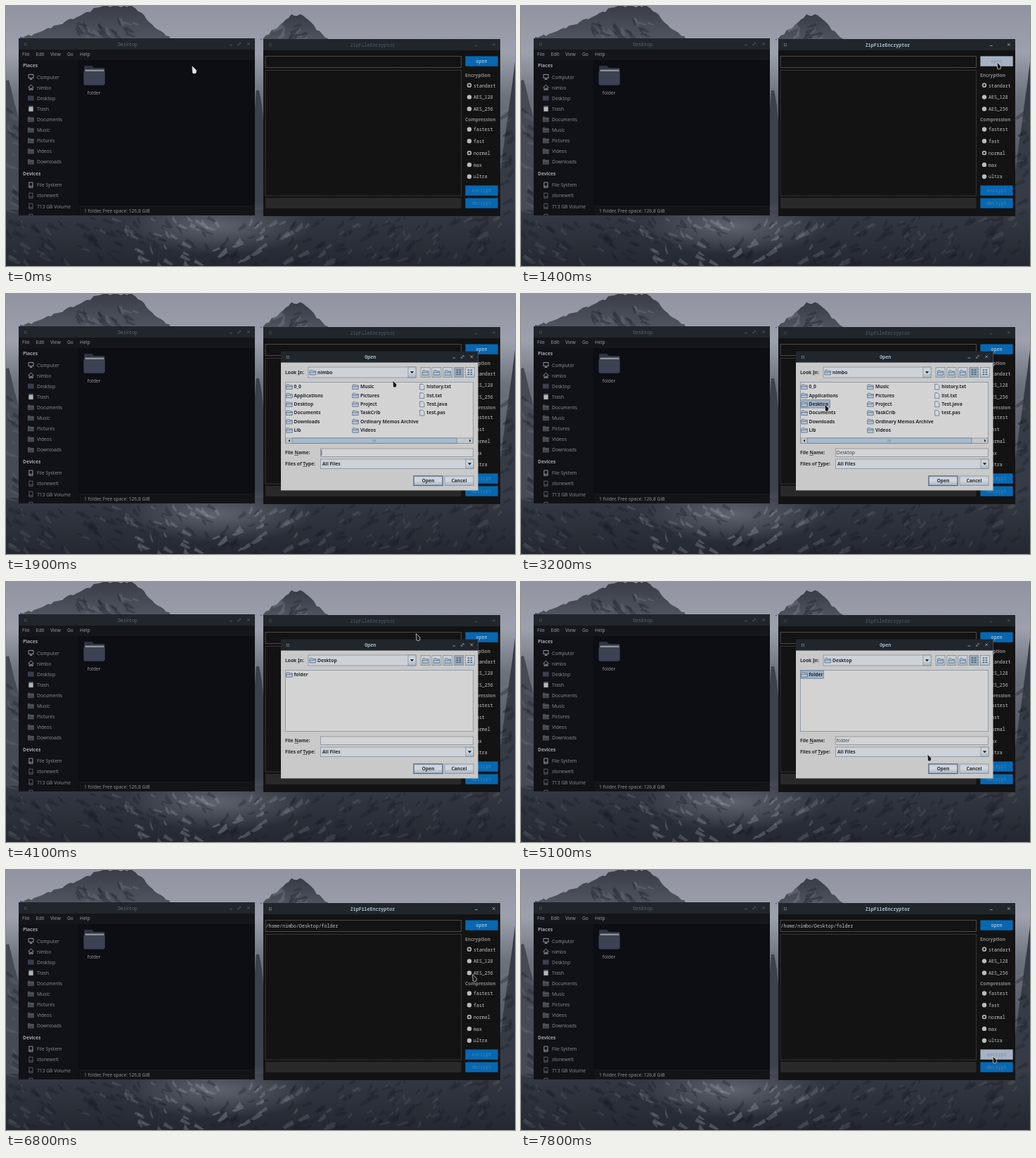
Write an HTML page that moves like this. It is 724 px wide and 370 px high and loops after 8 s.

```html
<!DOCTYPE html>
<html lang="en">
<head>
<meta charset="utf-8">
<title>Zip encryptor demo</title>
<style>
html, body { margin: 0; width: 100%; height: 100%; overflow: hidden; background: #272c35; }
svg { display: block; width: 724px; height: 370px; }
text { font: 6.7px "Noto Sans", sans-serif; white-space: pre; }
.bold { font-weight: 700; }
.mono { font: 6.6px "Noto Sans Mono", "DejaVu Sans Mono", monospace; }
.mono.bold { font-weight: 700; }
.mid { text-anchor: middle; }
</style>
</head>
<body>
<svg id="stage" viewBox="0 0 724 370" xmlns="http://www.w3.org/2000/svg">
  <defs>
    <linearGradient id="sky" x2="0" y2="1">
      <stop offset="0" stop-color="#9194a0"/><stop offset=".18" stop-color="#9da1ad"/>
      <stop offset=".35" stop-color="#6d717c"/><stop offset="1" stop-color="#2b303a"/>
    </linearGradient>
    <linearGradient id="rock" x2="0" y2="1">
      <stop offset="0" stop-color="#383c46"/><stop offset="1" stop-color="#50545f"/>
    </linearGradient>
    <linearGradient id="valley" x2="0" y2="1">
      <stop offset="0" stop-color="#343944"/><stop offset="1" stop-color="#232831"/>
    </linearGradient>
    <radialGradient id="snow">
      <stop offset="0" stop-color="#777c87" stop-opacity=".65"/><stop offset="1" stop-color="#777c87" stop-opacity="0"/>
    </radialGradient>
    <linearGradient id="metal" x2="0" y2="1">
      <stop offset="0" stop-color="#c3ccd6"/><stop offset=".45" stop-color="#d5d9dd"/>
      <stop offset="1" stop-color="#a6b5c5"/>
    </linearGradient>
    <clipPath id="sidebarClip"><rect x="18" y="77" width="86" height="221"/></clipPath>
  </defs>
</svg>
<script>
const LOOP = 8000, STEP = 100;
const USER = 'nimbo';
const stage = document.getElementById('stage');

function add(parent, tag, attrs = {}, content) {
  const node = document.createElementNS('http://www.w3.org/2000/svg', tag);
  for (const key in attrs) node.setAttribute(key, attrs[key]);
  if (content !== undefined) node.textContent = content;
  parent.append(node);
  return node;
}
const group = (parent, attrs) => add(parent, 'g', attrs);
const box = (p, x, y, width, height, fill, stroke, extra) =>
  add(p, 'rect', { x, y, width, height, fill, ...(stroke && { stroke, 'stroke-width': .7 }), ...extra });
const path = (p, d, fill = 'none', stroke = 'none', extra) =>
  add(p, 'path', { d, fill, stroke, 'stroke-width': .8, ...extra });
const label = (p, x, midY, content, fill, cls = '') =>
  add(p, 'text', { x, y: midY + 2.4, fill, class: cls }, content);

let seed = 11;
function random() {
  seed = (seed * 16807) % 2147483647;
  return seed / 2147483647;
}

// Mountain with a flat summit; its slopes sag inward and are broken by noise.
function mountain(left, summitLeft, summitRight, right, top, base, fill) {
  let d = `M${left} ${base}`;
  for (let x = left; x <= right; x += 4) {
    const rise = x < summitLeft ? (x - left) / (summitLeft - left)
      : x > summitRight ? (right - x) / (right - summitRight) : 1;
    d += `L${x} ${base - (base - top) * rise ** 1.15 + (random() - .5) * 4}`;
  }
  path(stage, d + `L${right} ${base}Z`, fill);
}

// Slanted facets that run down toward the snowy centre of the valley.
function facets(x, y, width, height, count) {
  for (let i = 0; i < count; i++) {
    const fx = x + random() * width, fy = y + random() * height;
    const near = Math.max(0, 1 - Math.abs(fx - 300) / 190);
    const run = (fx < 300 ? 1 : -1) * (4 + random() * 12), drop = 4 + random() * 9;
    const lit = random() < .3 + near * .35;
    path(stage, `M${fx} ${fy}l${run} ${drop}l${-run * .3} ${drop * .2}l${-run * .9} ${-drop * .6}Z`,
      lit ? '#8b909b' : '#171b23', 'none', { opacity: lit ? .15 + near * .3 : .3 });
  }
}

function drawBackdrop() {
  box(stage, 0, 0, 724, 370, 'url(#sky)');
  mountain(20, 136, 182, 234, 0, 46, 'url(#rock)');
  mountain(362, 406, 422, 458, 12, 47, 'url(#rock)');
  mountain(-40, -8, 4, 60, 105, 300, '#454a55');
  mountain(340, 356, 362, 380, 120, 300, '#3c414c');
  mountain(692, 724, 740, 760, 80, 300, '#363b45');
  box(stage, 0, 290, 724, 80, 'url(#valley)');
  add(stage, 'ellipse', { cx: 300, cy: 314, rx: 135, ry: 40, fill: 'url(#snow)' });
  facets(0, 296, 724, 68, 260);
  facets(100, 14, 85, 28, 26);
  facets(392, 22, 38, 20, 14);
  facets(0, 130, 12, 160, 16);
  facets(710, 110, 12, 180, 16);
}

function titleBar(p, x, y, width, title, color, cls = '', canMaximize = true) {
  const bar = group(p), right = x + width;
  box(bar, x, y, width, 16, '#20262c');
  for (let i = 0; i < 4; i++) box(bar, x + 8 + (i & 1) * 2.5, y + 6.5 + (i >> 1) * 2.5, 1.2, 1.2, color);
  label(bar, x + width / 2 - 13, y + 8.2, title, color, 'mid mono ' + cls);
  path(bar, `M${right - 36} ${y + 9.5}h3.5`, 'none', color);
  path(bar, `M${right - 11} ${y + 6}l3.6 3.6m0-3.6l-3.6 3.6`, 'none', color);
  if (canMaximize)
    path(bar, `M${right - 24} ${y + 9.8}l3.6-3.6m-1.8 0h1.8v1.8m-3.6 0v1.8h1.8`, 'none', color, { 'stroke-width': .6 });
  return bar;
}

function sideIcon(p, kind, y) {
  const light = '#b5b7bb', dim = '#686b73';
  if (kind === 'computer') path(p, `M32 ${y - 3.5}h7v5h-7zM35.5 ${y + 1.5}v2m-2 0h4`, 'none', light);
  else if (kind === 'home') path(p, `M31.5 ${y}l4-3.8l4 3.8m-6.5-.6v4h1.8v-2.4h1.6v2.4h1.7v-4`, 'none', light);
  else if (kind === 'trash') path(p, `M32.6 ${y - 2.5}h5.8v6h-5.8zM32 ${y - 3.7}h7`, light, light, { 'stroke-width': .5 });
  else if (kind === 'disk' || kind === 'drive')
    path(p, `M32.8 ${y - 3.7}h5.2v7.4h-5.2zm0 5.4h5.2`, 'none', kind === 'disk' ? light : dim);
  else if (kind === 'desk') box(p, 31, y - 3.5, 8.5, 7, '#3a3e4d');
  else path(p, `M31.3 ${y - 3.3}h3l1 1h4v5.6h-8zM31.3 ${y - 1}h8`, '#41444c', dim, { 'stroke-width': .6 });
}

function drawFileManager() {
  const win = group(stage);
  box(win, 18, 46, 336, 252, '#0c0e14');
  titleBar(win, 18, 46, 336, 'Desktop', '#5d656d');
  box(win, 18, 62, 336, 15, '#14161b');
  [['File', 23], ['Edit', 42.5], ['View', 63], ['Go', 87], ['Help', 105]].forEach(([s, x]) => label(win, x, 69, s, '#96989c'));
  box(win, 18, 77, 85.5, 221, '#101217');
  box(win, 103.5, 77, .6, 221, '#090a0e');
  box(win, 104, 284, 250, 14, '#12141a');
  label(win, 111, 291.2, '1 folder, Free space: 126,8 GiB', '#8d9095');

  const side = group(win, { 'clip-path': 'url(#sidebarClip)' });
  const list = (head, top, rows) => {
    label(side, 24, top - 16, head, '#a2a4a8', 'bold');
    rows.forEach(([name, kind], i) => {
      const y = top + i * 15.1;
      sideIcon(side, kind, y);
      label(side, 44, y + .2, name, '#85888d');
    });
  };
  list('Places', 101, [['Computer', 'computer'], [USER, 'home'], ['Desktop', 'desk'], ['Trash', 'trash'],
    ['Documents'], ['Music'], ['Pictures'], ['Videos'], ['Downloads']]);
  list('Devices', 254.7, [['File System', 'disk'], ['stonewelt', 'drive'], ['713 GB Volume', 'drive'], ['52 GB Volume', 'drive']]);

  path(win, 'M111 86.5q0-1.5 1.5-1.5h10l2.5 3h14q1.5 0 1.5 1.5v21q0 2-2 2h-25.5q-2 0-2-2z', '#303442');
  box(win, 112.5, 90.5, 27, 4, '#8d9095');
  path(win, 'M110.5 93h30v17.5q0 2-2 2h-26q-2 0-2-2z', '#3d4252');
  label(win, 125, 123.7, 'folder', '#94969b', 'mid');
}

const BLUE = '#0768b2', FADED = '#4584b0', BRIGHT = '#d0dbe4';
function blueButton(p, y, name, color) {
  const face = box(p, 653.4, y + .4, 46.3, 14.4, BLUE);
  const text = label(p, 676.5, y + 7.6, name, color, 'mono mid');
  return pressed => {
    face.setAttribute('fill', pressed ? '#a6b2c4' : BLUE);
    text.setAttribute('fill', pressed ? '#818b9c' : color);
  };
}

function drawEncryptor() {
  const win = group(stage);
  box(win, 366, 47, 337, 252, '#131313');
  const dimBar = titleBar(win, 366, 47, 337, 'ZipFileEncryptor', '#535d65', '', false);
  const brightBar = titleBar(win, 366, 47, 337, 'ZipFileEncryptor', '#a9bcc7', 'bold', false);
  box(win, 369, 71.5, 278.5, 16, '#131313', '#626262');
  box(win, 369, 91.5, 278.5, 178.5, '#131313', '#626262', { 'stroke-dasharray': '1 .6' });
  box(win, 369, 273, 278.5, 15, '#292929');
  const route = label(win, 369.5, 79.4, `/home/${USER}/Desktop/folder`, '#c4c4c4', 'mono');

  const radios = (head, y0, names, picked) => {
    label(win, 653, y0 - 14.3, head, '#888', 'bold');
    names.forEach((name, i) => {
      const y = y0 + i * 16.8;
      add(win, 'circle', { cx: 659, cy: y, r: 3.2, fill: '#b9bbbf' });
      if (i === picked) add(win, 'circle', { cx: 659, cy: y, r: 1.7, fill: '#25282d' });
      label(win, 665, y + .3, name, '#c2c2c2', 'mono');
    });
  };
  radios('Encryption', 112.8, ['standart', 'AES_128', 'AES_256'], 0);
  radios('Compression', 175.5, ['fastest', 'fast', 'normal', 'max', 'ultra'], 2);
  const pressOpen = blueButton(win, 71, 'open', BRIGHT);
  const pressEncrypt = blueButton(win, 255, 'encrypt', FADED);
  blueButton(win, 273, 'decrypt', FADED);
  return { brightBar, dimBar, route, pressOpen, pressEncrypt };
}

const INK = '#272a2e', EDGE = '#7a8794', PAPER = '#d3d3d3';
function folderIcon(p, x, y) {
  path(p, `M${x} ${y - 2}l1-1.2h2.6l1 1.2h4v5.5h-8.6zM${x} ${y - .4}h8.6`, '#b3c2d4', '#4f6379', { 'stroke-width': .7 });
}
function fileIcon(p, x, y) {
  path(p, `M${x} ${y - 3.7}h4l2.2 2.2v5.5h-6.2z`, '#d0d8e1', '#4f6379', { 'stroke-width': .7 });
}
function mnemonic(p, x, y, [before, key, after]) {
  const node = label(p, x, y, before, INK, 'bold');
  add(node, 'tspan', { 'text-decoration': 'underline' }, key);
  add(node, 'tspan', {}, after);
}
function combo(p, x, y, right, h) {
  box(p, x, y, right - x, h, '#cdd2d8', EDGE);
  box(p, right - 11, y, 11, h, 'url(#metal)', EDGE);
  path(p, `M${right - 8.3} ${y + h / 2 - 1.4}h5.6l-2.8 3.2z`, INK);
}
function toolButton(p, i) {
  const x = 590 + i * 15.9, chosen = i === 3;
  box(p, x, 104.5, 13, 14, chosen ? '#96a6b7' : 'url(#metal)', EDGE);
  if (i < 3) folderIcon(p, x + 2.3, 111.8);
  else for (let k = 0; k < 6; k++) box(p, x + 3 + (k & 1) * 4, 107.5 + (k >> 1) * 3, 2.6, 1.5, '#485c72');
}

function drawDialog() {
  const win = group(stage);
  box(win, 391, 82, 280.5, 197.5, '#c9c9c9');
  titleBar(win, 391, 81.5, 280.5, 'Open', '#a9bcc7', 'bold');

  mnemonic(win, 397, 111.2, ['Look ', 'I', 'n:']);
  combo(win, 430, 104, 583, 15);
  folderIcon(win, 432, 111.5);
  const place = label(win, 443, 111.3, '', INK, 'bold');
  for (let i = 0; i < 5; i++) toolButton(win, i);

  box(win, 397.5, 125.5, 267, 87, PAPER, EDGE);
  const home = group(win), desk = group(win);
  const pick = (p, y, width) => box(p, 397.5, y - 5.8, width, 11.4, '#9eb0c3', '#6c7f93');
  const homePick = pick(home, 156.5, 42), deskPick = pick(desk, 131.7, 33);
  const column = (names, x, textX, icon) => names.forEach((name, i) => {
    const y = 132 + i * 12.35;
    icon(home, x, y);
    label(home, textX, y, name, INK, 'bold');
  });
  column(['0_0', 'Applications', 'Desktop', 'Documents', 'Downloads', 'Lib'], 398.7, 409.5, folderIcon);
  column(['Music', 'Pictures', 'Project', 'TaskCrib', 'Ordinary Memos Archive', 'Videos'], 492.7, 504, folderIcon);
  column(['history.txt', 'list.txt', 'Test.java', 'test.pas'], 588.7, 598.3, fileIcon);
  box(home, 398, 205, 266, 7.5, '#c4c7cb', EDGE);
  box(home, 407, 205, 234, 7.5, '#a9bacb', '#61778e');
  path(home, 'M522 207v3.5m1.8-3.5v3.5m1.8-3.5v3.5', 'none', '#617283', { 'stroke-width': .5 });
  path(home, 'M404 206.8v4l-2.6-2zM659 206.8v4l2.6-2z', INK);
  folderIcon(desk, 398.7, 131.8);
  label(desk, 409.5, 131.6, 'folder', INK, 'bold');

  mnemonic(win, 397, 225.7, ['File ', 'N', 'ame:']);
  box(win, 447.5, 220, 217, 11.5, PAPER, EDGE);
  const caret = box(win, 448.5, 221.5, .7, 8.5, INK);
  const fileName = label(win, 448.8, 225.7, '', '#3b3d40');
  mnemonic(win, 397, 241.7, ['Files of ', 'T', 'ype:']);
  combo(win, 447.5, 235, 665, 13.5);
  label(win, 450, 241.5, 'All Files', INK, 'bold');
  box(win, 580, 259, 41, 13.5, 'url(#metal)', '#566c83', { 'stroke-width': 1.4 });
  box(win, 624, 259, 41, 13.5, 'url(#metal)', EDGE);
  label(win, 600.5, 266, 'Open', INK, 'bold mid');
  label(win, 644.5, 266, 'Cancel', INK, 'bold mid');
  return { win, place, home, desk, homePick, deskPick, caret, fileName };
}

// The pointer rests, then travels; a sweep swings it around the straight line.
const moves = [
  { at: 0, steps: 1, to: [265, 86] },
  { at: 200, steps: 2, to: [494, 98] },
  { at: 500, steps: 2, to: [665, 80] },
  { at: 800, steps: 1, to: [677, 80] },
  { at: 1800, steps: 2, to: [550, 123] },
  { at: 2200, steps: 7, to: [432, 157], sweep: [130, 70] },
  { at: 3500, steps: 9, to: [424, 132], sweep: [245, 65] },
  { at: 4400, steps: 8, to: [578, 245], sweep: [130, -40] },
  { at: 5200, steps: 3, to: [588, 267] },
  { at: 6100, steps: 2, to: [619, 169] },
  { at: 6400, steps: 3, to: [662, 118] },
  { at: 6800, steps: 3, to: [667, 210] },
  { at: 7200, steps: 5, to: [671, 265] }
];
function pointerAt(t) {
  const i = moves.findLastIndex(move => move.at <= t);
  const { at, steps, to, sweep = [0, 0] } = moves[i];
  const from = moves[Math.max(0, i - 1)].to;
  const u = Math.min(1, (Math.floor((t - at) / STEP) + 1) / steps);
  return to.map((end, axis) =>
    from[axis] + (end - from[axis]) * u + sweep[axis] * Math.sin(Math.PI * u * (axis + 1)));
}

drawBackdrop();
drawFileManager();
const app = drawEncryptor();
const dialog = drawDialog();
const pointer = path(stage, 'M0 0L5.8 5.6L5 9.4Q3 10.8 .6 9.2Z', '#17191c', '#d8d8d8', { 'stroke-linejoin': 'round' });

const show = (node, on) => node.setAttribute('visibility', on ? 'inherit' : 'hidden');
const within = (t, from, to) => t >= from && t < to;

function dialogOpacity(t) {
  if (!within(t, 1700, 5800)) return 0;
  if (t < 1800) return .22;
  if (t < 1900) return .7;
  return t < 5700 ? 1 : .4;
}

function render(t) {
  const focused = within(t, 1400, 1700) || t >= 5900;
  show(app.brightBar, focused);
  show(app.dimBar, !focused);
  show(app.route, t >= 5900);
  app.pressOpen(within(t, 1400, 1800));
  app.pressEncrypt(t >= 7800);

  const opacity = dialogOpacity(t), inDesktop = t >= 3300, picked = t >= 4300;
  show(dialog.win, opacity > 0);
  dialog.win.setAttribute('opacity', opacity);
  show(dialog.home, !inDesktop);
  show(dialog.desk, inDesktop);
  show(dialog.homePick, t >= 3100 && !inDesktop);
  show(dialog.deskPick, picked);
  dialog.place.textContent = inDesktop ? 'Desktop' : USER;
  dialog.fileName.textContent = picked ? 'folder' : within(t, 3100, 3300) ? 'Desktop' : '';
  show(dialog.caret, t < 3100);

  const [x, y] = pointerAt(t);
  pointer.setAttribute('transform', `translate(${x} ${y})`);
  pointer.setAttribute('fill', t < 500 ? '#e2e2e2' : '#17191c');
}

function tick() {
  render(performance.now() % LOOP);
  requestAnimationFrame(tick);
}
tick();
</script>
</body>
</html>
```
